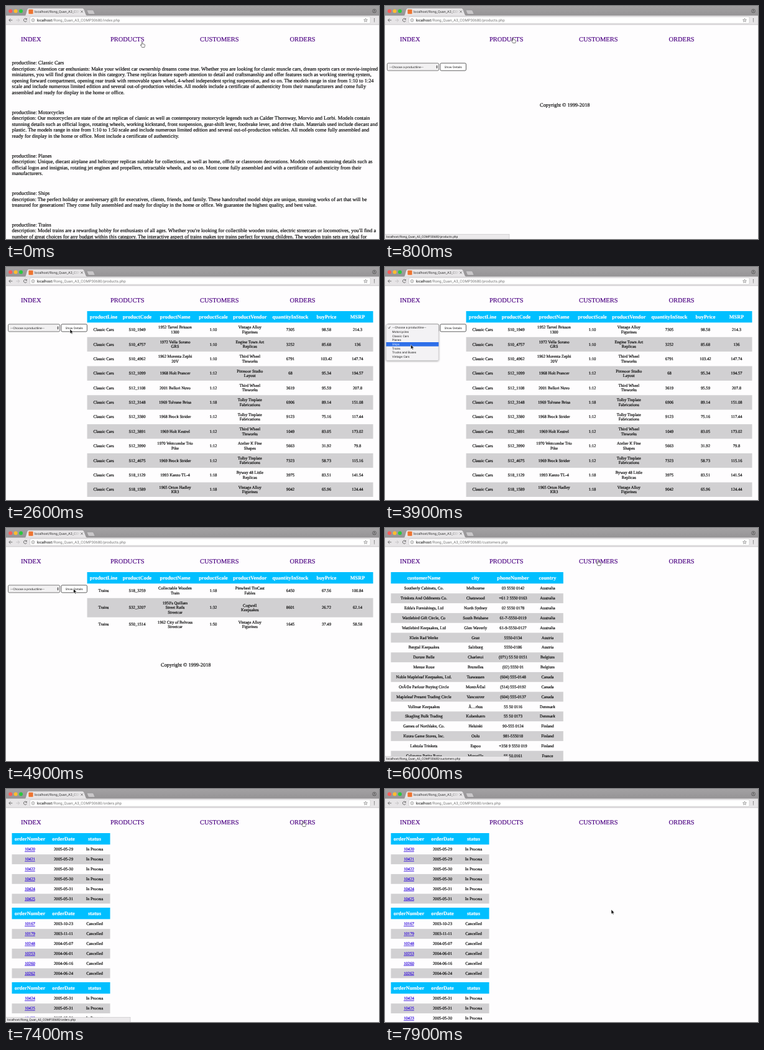
An HTML page for the animation above (8 s loop, 600 by 375 pixels).

```html
<!DOCTYPE html>
<html lang="en">
<head>
<meta charset="utf-8">
<title>Model shop</title>
<style>
html, body { margin: 0; width: 100%; height: 100%; overflow: hidden; background: #fefdfe; }
svg { display: block; width: 600px; height: 375px; }
text { white-space: pre; text-rendering: geometricPrecision; }
.body, .head { font: 8.33px "Liberation Serif", Times, serif; }
.nav { font: 10.45px "Liberation Serif", Times, serif; fill: #4b0082; stroke: #4b0082; }
.head { font-weight: bold; fill: #fff; stroke: #fff; }
.cell { font: 6.67px "Liberation Serif", Times, serif; }
.body, .cell { stroke: #000; }
.body, .cell, .nav, .head { stroke-width: .16px; }
.head, .cell, .mid { text-anchor: middle; }
.cell.link { fill: #2a00d8; stroke: #2a00d8; text-decoration: underline; }
.bar { font-family: Roboto, sans-serif; fill: #111; }
.ui { font: 4.6px Inter, sans-serif; fill: #111; }
</style>
</head>
<body>
<svg id="stage" viewBox="0 0 600 375"></svg>
<script>
const LOOP = 8000, STEP = 100;
const ROOT = '/Rong_Quan_A3_COMP30680/';

const text = (x, y, s, cls, more = '') => `<text x="${x}" y="${y}" class="${cls}" ${more}>${s}</text>`;
const rect = (x, y, w, h, fill, more = '') =>
  `<rect x="${x}" y="${y}" width="${w}" height="${h}" fill="${fill}" ${more}/>`;
const path = (d, stroke, more = '') => `<path d="${d}" fill="none" stroke="${stroke}" ${more}/>`;
const group = (id, s) => `<g id="${id}">${s}</g>`;

// Cells are split by "|", lines inside a cell by "/".
const HEAD = 18.4, LINE = 7.54, PAD = 8.3;
function table(x, w, y, cols, head, rows, links) {
  let out = rect(x, y, w, HEAD, '#00bfff');
  head.split(' ').forEach((s, i) => out += text(cols[i], y + 11.9, s, 'head'));
  y += HEAD;
  rows.forEach((row, r) => {
    const cells = row.split('|').map(c => c.split('/'));
    const h = PAD + LINE * Math.max(...cells.map(c => c.length));
    if (r % 2) out += rect(x, y, w, h, '#d1d0d2');
    cells.forEach((lines, c) => lines.forEach((s, i) => {
      const base = y + h / 2 + (i - (lines.length - 1) / 2) * LINE + 2.1;
      out += text(cols[c], base, s, links && !c ? 'cell link' : 'cell');
    }));
    y += h;
  });
  return out;
}

const lineups = [
  ['Classic Cars',
    'Attention car enthusiasts: Make your wildest car ownership dreams come true. Whether you are looking for classic muscle cars, dream sports cars or movie-inspired',
    'miniatures, you will find great choices in this category. These replicas feature superb attention to detail and craftsmanship and offer features such as working steering system,',
    'opening forward compartment, opening rear trunk with removable spare wheel, 4-wheel independent spring suspension, and so on. The models range in size from 1:10 to 1:24',
    'scale and include numerous limited edition and several out-of-production vehicles. All models include a certificate of authenticity from their manufacturers and come fully',
    'assembled and ready for display in the home or office.'],
  ['Motorcycles',
    'Our motorcycles are state of the art replicas of classic as well as contemporary motorcycle legends such as Calder Thornway, Morvio and Lorbi. Models contain',
    'stunning details such as official logos, rotating wheels, working kickstand, front suspension, gear-shift lever, footbrake lever, and drive chain. Materials used include diecast and',
    'plastic. The models range in size from 1:10 to 1:50 scale and include numerous limited edition and several out-of-production vehicles. All models come fully assembled and',
    'ready for display in the home or office. Most include a certificate of authenticity.'],
  ['Planes',
    'Unique, diecast airplane and helicopter replicas suitable for collections, as well as home, office or classroom decorations. Models contain stunning details such as',
    'official logos and insignias, rotating jet engines and propellers, retractable wheels, and so on. Most come fully assembled and with a certificate of authenticity from their',
    'manufacturers.'],
  ['Ships',
    'The perfect holiday or anniversary gift for executives, clients, friends, and family. These handcrafted model ships are unique, stunning works of art that will be',
    'treasured for generations! They come fully assembled and ready for display in the home or office. We guarantee the highest quality, and best value.'],
  ['Trains',
    "Model trains are a rewarding hobby for enthusiasts of all ages. Whether you're looking for collectible wooden trains, electric streetcars or locomotives, you'll find a",
    'number of great choices for any budget within this category. The interactive aspect of trains makes toy trains perfect for young children. The wooden train sets are ideal for']
];
function indexPage() {
  let y = 94, out = '';
  for (const [name, ...lines] of lineups) {
    ['productline: ' + name, 'description: ' + lines[0], ...lines.slice(1)].forEach(s => {
      out += text(9.5, y, s, 'body');
      y += 9.6;
    });
    y += 22;
  }
  return out;
}

const productTable = rows => table(130.5, 460, 71, [157, 211, 272, 333.5, 392.3, 457.5, 515.5, 565.5],
  'productLine productCode productName productScale productVendor quantityInStock buyPrice MSRP', rows);
const cars = [
  'S10_1949|1952 Tarvel Brisson/1300|1:10|Vintage Alloy/Figurines|7305|98.58|214.3',
  'S10_4757|1972 Vella Sorano/GRS|1:10|Engine Town Art/Replicas|3252|85.68|136',
  'S10_4962|1962 Morenta Zephi/20V|1:10|Third Wheel/Tinworks|6791|103.42|147.74',
  'S12_1099|1968 Holt Prancer|1:12|Pixmoor Studio/Layout|68|95.34|194.57',
  'S12_1108|2001 Bellori Nuvo|1:12|Third Wheel/Tinworks|3619|95.59|207.8',
  'S12_3148|1969 Tolvane Brisa|1:18|Tolby Tinplate/Fabrications|6906|89.14|151.08',
  'S12_3380|1968 Brock Strider|1:12|Tolby Tinplate/Fabrications|9123|75.16|117.44',
  'S12_3891|1969 Holt Kestrel|1:12|Third Wheel/Tinworks|1049|83.05|173.02',
  'S12_3990|1970 Wexcombe Trio/Pike|1:12|Atelier K Fine/Shapes|5663|31.92|79.8',
  'S12_4675|1969 Brock Strider|1:12|Tolby Tinplate/Fabrications|7323|58.73|115.16',
  'S18_1129|1993 Kanzo TL-4|1:18|Byway 48 Little/Replicas|3975|83.51|141.54',
  'S18_1589|1965 Orton Hadley/KR3|1:18|Vintage Alloy/Figurines|9042|65.96|124.44'
].map(s => 'Classic Cars|' + s);
const trains = [
  'S18_3259|Collectable Wooden/Train|1:18|Pinwheel TinCast/Fables|6450|67.56|100.84',
  "S32_3207|1950's Quillam/Street Rails/Streetcar|1:32|Cogwell/Keepsakes|8601|26.72|62.14",
  'S50_1514|1962 City of Belvoss/Streetcar|1:50|Vintage Alloy/Figurines|1645|37.49|58.58'
].map(s => 'Trains|' + s);
const customers = [
  'Southerly Cabinets, Co.|Melbourne|03 5550 0142|Australia',
  'Trinkets And Oddments Co.|Chatswood|+61 2 5550 0163|Australia',
  "Edda's Furnishings, Ltd|North Sydney|02 5550 0178|Australia",
  'Wattlebird Gift Circle, Co|South Brisbane|61-7-5550-0119|Australia',
  'Wattlebird Keepsakes, Ltd|Glen Waverly|61-9-5550-0127|Australia',
  'Klein Rad Werke|Graz|5550-0134|Austria',
  'Bergtal Keepsakes|Salzburg|5550-0186|Austria',
  'Dorure Belle|Charleroi|(071) 55 50 0151|Belgium',
  'Menue Roue|Bruxelles|(02) 5550 01|Belgium',
  'Noble Mapleleaf Keepsakes, Ltd.|Tsawassen|(604) 555-0148|Canada',
  'OrÃ©e Parlour Buying Circle|MontrÃ©al|(514) 555-0192|Canada',
  'Mapleleaf Present Trading Circle|Vancouver|(604) 555-0137|Canada',
  'Vollmar Keepsakes|Ã…rhus|55 50 0116|Denmark',
  'Skagling Bulk Trading|Kobenhavn|55 50 0173|Denmark',
  'Games of Northlake, Co.|Helsinki|90-555 0124|Finland',
  'Kuura Game Stores, Inc.|Oulu|981-555018|Finland',
  'Lehtola Trinkets|Espoo|+358 9 5550 019|Finland',
  'Calanque Petite Roue|Marseille|55.50.0161|France'
];
const orderLists = [
  ['10420|2005-05-29', '10421|2005-05-29', '10422|2005-05-30', '10423|2005-05-30', '10424|2005-05-31', '10425|2005-05-31'],
  ['10167|2003-10-23', '10179|2003-11-11', '10248|2004-05-07', '10253|2004-06-01', '10260|2004-06-16', '10262|2004-06-24'],
  ['10424|2005-05-31', '10425|2005-05-31', '10423|2005-05-30', '10422|2005-05-30']
];
const copyright = y => text(289.3, y, 'Copyright © 1999-2018', 'body mid');
const pages = {
  index: indexPage(),
  products: copyright(161.6),
  cars: productTable(cars),
  trains: productTable(trains) + copyright(222.5),
  customers: table(9.5, 277.3, 71, [62.5, 145.7, 206, 261.5], 'customerName city phoneNumber country', customers),
  orders: orderLists.map((list, i) => table(9.5, 158, 71 + 120 * i, [38.5, 92.5, 142.5],
    'orderNumber orderDate status', list.map(s => s + (i == 1 ? '|Cancelled' : '|In Process')), true)).join('')
};

const links = [['index', 24, 57], ['products', 168, 223], ['customers', 312, 375], ['orders', 456.5, 497.5]];
const choices = ['--Choose a productline--', 'Motorcycles', 'Classic Cars', 'Planes', 'Ships', 'Trains', 'Trucks and Buses', 'Vintage Cars'];
const ITEM = 6.7, MENU = 94.2;

const chrome =
  rect(0, 0, 600, 16, 'url(#strip)') + rect(0, 15.5, 600, 14.5, '#e7e5e7') + rect(0, 29.6, 600, .7, '#b9b7b9') +
  ['#fc5b57', '#fdbc2f', '#2ac840'].map((c, i) => `<circle cx="${7.2 + i * 8.4}" cy="8.2" r="3" fill="${c}"/>`).join('') +
  '<path d="M30 16C33 15 32.500 3.5 36.500 3.5H123C127 3.5 127 15 131 16Z" fill="#e7e5e7" stroke="#858386" stroke-width=".4"/>' +
  rect(30, 15.6, 101, 1, '#e7e5e7') + rect(36.4, 5.6, 7.2, 7.2, '#ee7430', 'rx="1"') +
  `<g clip-path="url(#tab)">${text(46, 11, 'localhost' + ROOT, 'bar', 'style="font-size:5.4px;fill:url(#fade)"')}</g>` +
  path('M120.3 7.4l3.4 3.4m0-3.4l-3.4 3.4', '#555', 'stroke-width=".7"') +
  '<path d="M130 6.5H139Q140.5 6.5 141 8L143 13H134Q132.5 13 132 11.5Z" fill="#c9c7c9" stroke="#858386" stroke-width=".4"/>' +
  '<circle cx="592.5" cy="8" r="3" fill="none" stroke="#555" stroke-width=".7"/><circle cx="592.5" cy="7" r="1" fill="#555"/>' +
  path('M590.5 10Q592.5 8 594.5 10', '#555', 'stroke-width=".7"') +
  path('M10.3 22.8H4.9M7.4 20.2L4.8 22.8L7.4 25.4', '#555', 'stroke-width=".8"') +
  path('M16.3 22.8H21.7M19.2 20.2L21.8 22.8L19.2 25.4', '#bdbbbd', 'stroke-width=".8"') +
  path('M33 21A2.6 2.6 0 1 0 33.4 23.7M33.3 19.8V21.7H31.3', '#555', 'stroke-width=".8"') +
  rect(38.5, 17.3, 547.5, 10.8, '#fff', 'rx="1.5" stroke="#bbb9bb" stroke-width=".5"') +
  '<circle cx="43.5" cy="22.8" r="2.4" fill="none" stroke="#666" stroke-width=".6"/>' +
  path('M43.5 22.4V24.3M43.5 21.2V21.8', '#666', 'stroke-width=".6"') +
  path('M578.5 19.9l.8 2 2.1.1-1.7 1.3.6 2.1-1.8-1.2-1.8 1.2.6-2.1-1.7-1.3 2.1-.1z', '#666', 'stroke-width=".6"') +
  [20.5, 22.8, 25.1].map(y => `<circle cx="592.5" cy="${y}" r=".7" fill="#555"/>`).join('') +
  text(49.5, 25, 'localhost<tspan id="url" fill="#777"></tspan>', 'bar', 'style="font-size:6.05px"');

const form =
  rect(3.5, 92, 83, 12, '#f2f1f2', 'rx="1.8" stroke="#444" stroke-width=".7"') +
  text(7, 99.7, '', 'ui', 'id="value"') +
  '<path d="M82.2 97.4L83.5 95.4L84.8 97.4ZM82.2 98.6L83.5 100.6L84.8 98.6Z" fill="#222"/>' +
  rect(88.8, 92, 41.6, 12, '#fff', 'rx="1.8" stroke="#333" stroke-width=".8"') +
  text(109.6, 99.7, 'Show Details', 'ui mid');

const menu =
  rect(1.8, 92.2, 84.5, 58.4, '#f3f2f4', 'rx="2" stroke="#b5b4b6" stroke-width=".5" filter="url(#shade)"') +
  rect(1.8, 0, 84.5, ITEM, '#2e6fe9', 'id="mark"') +
  path('M5.3 97.6l1.2 1.5 2-3.4', '#222', 'stroke-width=".7"') +
  choices.map((s, i) => text(11.5, MENU + i * ITEM + 5, s, 'ui item')).join('');

const $ = id => document.getElementById(id);
$('stage').innerHTML = `<defs>
  <linearGradient id="strip" x2="0" y2="1"><stop stop-color="#a3a1a3"/><stop offset="1" stop-color="#959395"/></linearGradient>
  <linearGradient id="fade" gradientUnits="userSpaceOnUse" x1="104" x2="119"><stop stop-color="#333"/><stop offset="1" stop-color="#333" stop-opacity="0"/></linearGradient>
  <clipPath id="tab"><rect x="45" y="3" width="74" height="12"/></clipPath>
  <filter id="shade"><feDropShadow dx="0" dy="1" stdDeviation="1.5" flood-opacity=".35"/></filter></defs>` +
  rect(0, 0, 600, 375, '#fefdfe') + links.map(([s, x]) => text(x, 56.8, s.toUpperCase(), 'nav')).join('') +
  group('form', form) + Object.keys(pages).map(k => group(k, pages[k])).join('') + chrome + group('menu', menu) +
  group('status', rect(-1, 367.4, 201, 9, '#ebe9eb', 'stroke="#bbb9bb" stroke-width=".5"') +
    text(2, 373, '', 'bar', 'id="target" style="font-size:4.88px"')) +
  group('arrow', '<path d="M0 0V7.2L1.7 5.7L2.8 8.1L4 7.6L2.9 5.2H5.1Z" fill="#111" stroke="#fff" stroke-width=".5"/>') +
  group('hand', '<path d="M-.8 .8Q0-.4 .8 .8V3.2Q1.7 2.6 2 3.4Q3 2.9 3.3 3.8Q4.4 3.4 4.5 4.6Q4.5 6.7 3.7 8.5H-.4Q-1.5 6.5-2.9 4.8Q-2.4 3.7-.8 5.2Z" fill="#fff" stroke="#222" stroke-width=".6"/>');

// Pointer stops: time, x, y
const stops = [[0, 219, 58], [400, 210, 53], [800, 206, 51], [1000, 205, 52], [1400, 50, 98], [1500, 50, 98],
  [1700, 40, 110], [1800, 40, 110], [2200, 103, 100], [2800, 103, 100], [3200, 50, 98], [3300, 50, 98],
  [3800, 41.5, 125], [3900, 41.5, 125], [4200, 40, 131], [4300, 40, 131], [4600, 108.5, 97.8], [4900, 108.5, 97.8],
  [5400, 343, 52], [6000, 343, 52], [6400, 386.5, 80.5], [6700, 386.5, 80.5], [7100, 478, 52], [7400, 478, 52],
  [7800, 364, 194], [8000, 364, 194]];
const visits = [[0, 'index'], [500, 'products'], [2400, 'cars'], [4700, 'trains'], [5800, 'customers'], [7300, 'orders']];
const within = (t, a, b) => t >= a && t < b;
const show = (id, on) => $(id).style.display = on ? '' : 'none';

function pointer(t) {
  const i = stops.findIndex(s => s[0] > t), [t0, x0, y0] = stops[i - 1], [t1, x1, y1] = stops[i];
  const p = (t - t0) / (t1 - t0), e = p * p * (3 - 2 * p);
  return [x0 + (x1 - x0) * e, y0 + (y1 - y0) * e];
}

function draw(now) {
  const t = Math.floor(now % LOOP / STEP) * STEP;
  const [x, y] = pointer(t);
  const page = visits.filter(v => v[0] <= t).pop()[1];
  const shop = ['products', 'cars', 'trains'].includes(page);
  for (const k in pages) show(k, k == page);
  show('form', shop);
  $('url').textContent = ROOT + (shop ? 'products' : page) + '.php';
  $('value').textContent = within(t, 1800, 2400) ? choices[2] : within(t, 4300, 4700) ? choices[5] : choices[0];

  show('menu', within(t, 1500, 1800) || within(t, 3300, 4300));
  const pick = Math.max(0, Math.floor((y - MENU) / ITEM));
  $('mark').setAttribute('y', MENU + pick * ITEM);
  document.querySelectorAll('.item').forEach((el, i) => el.style.fill = i == pick ? '#fff' : '');

  const link = links.find(l => within(x, l[1], l[2]) && within(y, 46, 60));
  show('hand', link);
  show('arrow', !link);
  show('status', link && t >= 200);
  if (link) $('target').textContent = 'localhost' + ROOT + link[0] + '.php';
  for (const id of ['hand', 'arrow']) $(id).setAttribute('transform', `translate(${x} ${y})`);
  requestAnimationFrame(() => draw(performance.now() - start));
}
const start = performance.now();
draw(0);
</script>
</body>
</html>
```
